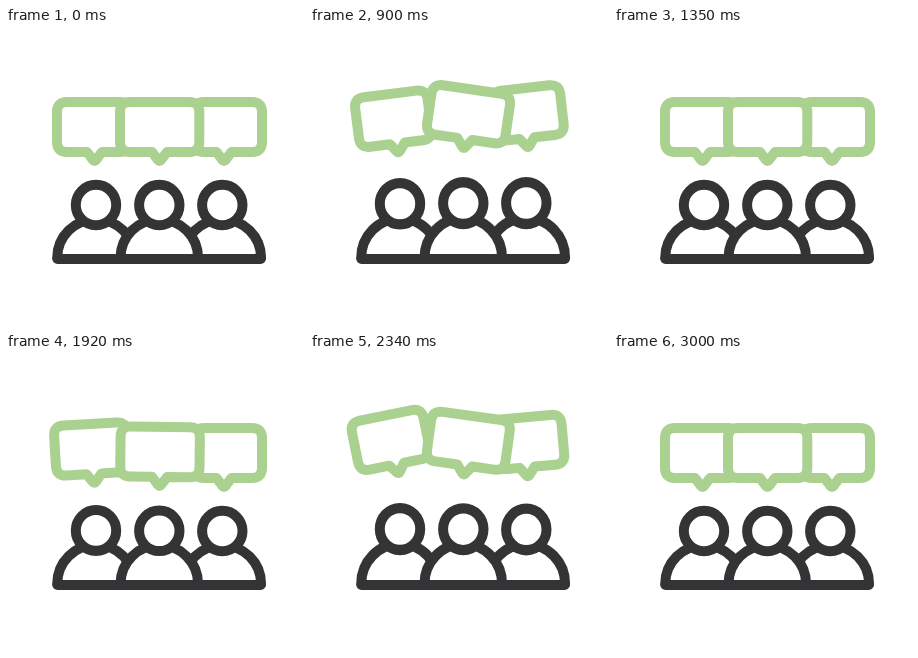
An HTML page that plays this animation: 298 by 298 pixels, repeating every 3030 ms.

```html
<!DOCTYPE html>
<html lang="en">
<head>
<meta charset="utf-8">
<title>Group discussion</title>
<style>
  html, body { margin: 0; height: 100%; overflow: hidden; background: #fff; }
  svg { display: block; width: 100vw; height: 100vh; }
  path, circle { fill: #fff; stroke-width: 10; stroke-linecap: round; stroke-linejoin: round; }
  .bubble { stroke: #abd190; }
  .person { stroke: #343437; }
</style>
</head>
<body>
<svg viewBox="0 0 298 298"><g id="stage"></g><path class="person" d="M51.5 231H254.7"/></svg>
<script>
const LOOP = 3030, SECOND_START = 1660;
const BASE = 231, TAIL = 133, LIFT = 14, STRETCH = 0.037;

// Drawn back to front; start, peak and end are times within one wave.
const members = [
  { x: 90, tail: 88.5, left: 51, right: 124, angle: -11.5, start: 30, peak: 660, end: 1230 },
  { x: 216.3, tail: 218, left: 188, right: 256, angle: -6.5, start: 250, peak: 880, end: 1355 },
  { x: 153.3, tail: 153.5, left: 114, right: 193.3, angle: 8.8, start: 140, peak: 820, end: 1320 }
];

const bubblePath = ({ left, right, tail }) =>
  `M${left + 10} 74H${right - 10}q10 0 10 10V114q0 10 -10 10H${tail + 7.5}
   l-6 8q-1.5 2 -3 0l-6 -8H${left + 10}q-10 0 -10 -10V84q0 -10 10 -10Z`;

const stage = document.getElementById("stage");
stage.innerHTML = members.map(m => `
  <g><path class="bubble" d="${bubblePath(m)}"/></g>
  <g class="person">
    <path d="M${m.x - 38.8} ${BASE - 1}a38.8 38.8 0 0 1 77.6 0"/>
    <circle cx="${m.x}" cy="177" r="20.2"/>
  </g>`).join("");
const groups = [...stage.children];

// Smooth rise from start to peak, then fall to end.
function swell(t, { start, peak, end }) {
  if (t <= start || t >= end) return 0;
  const u = t < peak ? (t - start) / (peak - start) : (end - t) / (end - peak);
  return Math.sin(u * Math.PI / 2) ** 2;
}

function draw(now) {
  const t = now % LOOP;
  const wave = t < SECOND_START ? t : t - SECOND_START;
  members.forEach((m, i) => {
    const s = swell(wave, m);
    groups[2 * i].setAttribute("transform",
      `translate(0 ${-LIFT * s}) rotate(${m.angle * s} ${m.tail} ${TAIL})`);
    groups[2 * i + 1].setAttribute("transform",
      `translate(0 ${BASE}) scale(1 ${1 + STRETCH * s}) translate(0 ${-BASE})`);
  });
  requestAnimationFrame(() => draw(performance.now()));
}
draw(performance.now());
</script>
</body>
</html>
```
